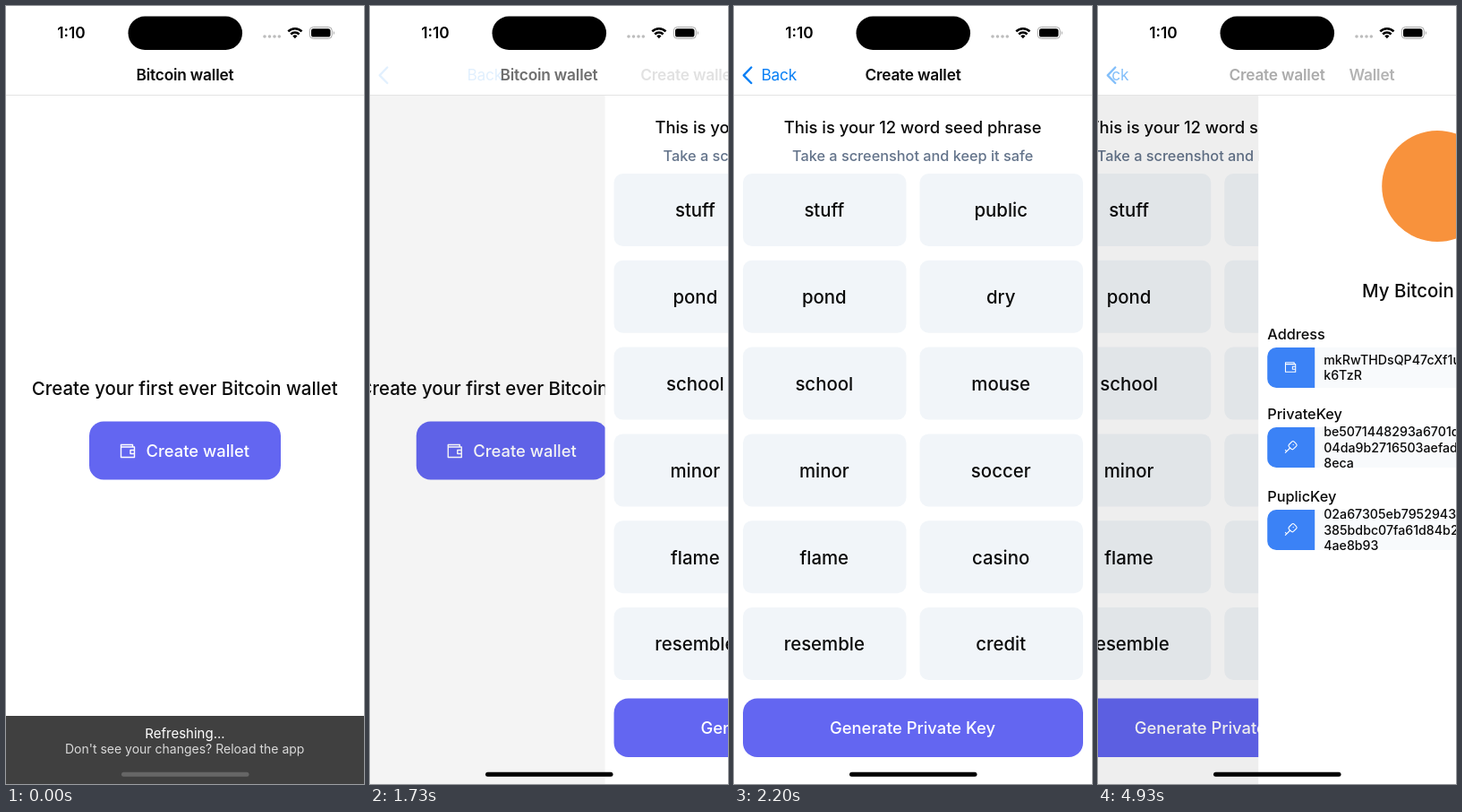
Animation of 400x868 px, one loop 5 s. Source, as an HTML page:

```html
<!DOCTYPE html>
<html lang="en">
<head>
<meta charset="utf-8">
<title>Wallet app</title>
<style>
  html, body { margin: 0; width: 100%; height: 100%; overflow: hidden; background: #fff; }
  svg { display: block; width: 400px; height: 868px; }
  text { font-family: Inter, "Liberation Sans", sans-serif; white-space: pre; }
  .nav { letter-spacing: -.2px; }
  .tile { fill: #f1f5f9; }
  .button { fill: #6366f1; }
  .pressed .button { fill: #e0e0fc; }
  .shade { opacity: 0; }
  .icon { fill: none; stroke: #fff; stroke-width: 1.4; stroke-linejoin: round; }
</style>
</head>
<body>
<svg id="stage" viewBox="0 0 400 868"></svg>
<script>
const INK = '#0a0a0a', BLUE = '#087ff5';
const FRAME = 1000 / 15, LOOP = 5000;
const PUSH1 = 25 * FRAME, PUSH2 = 4832;

// y is the middle of the capitals
const text = (x, y, size, str, { weight = 500, fill = INK, anchor = 'middle', extra = '' } = {}) =>
  `<text x="${x}" y="${(y + size * .364).toFixed(1)}" font-size="${size}" font-weight="${weight}" ` +
  `fill="${fill}" text-anchor="${anchor}" ${extra}>${str}</text>`;

const rect = (x, y, w, h, r, attrs) =>
  `<rect x="${x}" y="${y}" width="${w}" height="${h}" rx="${r}" ${attrs}/>`;

const page = (id, body) =>
  `<g id="${id}">${rect(0, 99, 400, 769, 0, 'fill="#fff"')}${body}` +
  `${rect(0, 99, 400, 769, 0, 'class="shade"')}</g>`;

const walletIcon = (x, y, scale = 1) =>
  `<path class="icon" transform="translate(${x} ${y}) scale(${scale})"
    d="M1 3.5V15h15V3.5ZM1 3.5V1h13v2.5M16 7h-4.500v4H16"/>`;

const keyIcon = (x, y) =>
  `<g class="icon" style="stroke-width:1.1" transform="translate(${x} ${y}) rotate(45)">
    <rect x="-3.500" y="-8" width="7" height="8" rx="1.800"/><path d="M0 0V8M0 5.500H-2.400M0-5.500V-4.300"/></g>`;

const title = (id, str) => `<g id="${id}">${text(200, 77, 17.3, str, { weight: 600, extra: 'class="nav"' })}</g>`;

const startPage = page('start',
  text(199.7, 427, 20.4, 'Create your first ever Bitcoin wallet') +
  rect(93, 463.5, 214, 65, 16, 'class="button"') +
  walletIcon(127.5, 488.5) +
  text(156.5, 496, 18.4, 'Create wallet', { fill: '#fff', anchor: 'start' }));

const words = 'stuff public pond dry school mouse minor soccer flame casino resemble credit'.split(' ');
const tile = (word, i) => {
  const col = i % 2, y = 187 + 96.8 * (i >> 1);
  return rect(10 + 197.5 * col, y, 182.5, 81, 10, 'class="tile"') + text(100.8 + 197.4 * col, y + 41, 20.4, word);
};
const seedPage = page('seed',
  text(199.7, 135.5, 18.4, 'This is your 12 word seed phrase') +
  text(199.7, 167, 16.3, 'Take a screenshot and keep it safe', { fill: '#64748b' }) +
  words.map(tile).join('') +
  rect(10, 772.5, 380, 65.5, 16, 'class="button"') +
  text(199.5, 805, 18.4, 'Generate Private Key', { fill: '#fff' }));

const field = (label, y, icon, lines) =>
  text(10, y - 15, 16.3, label, { anchor: 'start' }) +
  rect(10, y, 380, 45, 10, 'fill="#f8fafc"') +
  `<path d="M63 ${y}H20a10 10 0 0 0-10 10v25a10 10 0 0 0 10 10h43Z" fill="#3b82f6"/>` + icon +
  lines.map((s, i) => text(73, y + 22.3 + 17.3 * (i - (lines.length - 1) / 2), 14.2, s, { anchor: 'start' })).join('');

const walletPage = page('wallet',
  '<circle cx="200" cy="201" r="62" fill="#f8923c"/>' +
  text(200, 318, 20.4, 'My Bitcoin Wallet') +
  field('Address', 381, walletIcon(29.5, 397, .75), ['mkRwTHDsQP47cXf1uVaZ8eLt2NbGy', 'k6TzR']) +
  field('PrivateKey', 470, keyIcon(35.5, 493),
    ['be5071448293a6701d52f8c39e0b47', '04da9b2716503aefadc81b60e72f35', '8eca']) +
  field('PuplicKey', 562, keyIcon(35.5, 585),
    ['02a67305eb7952943d18f06c2b74e9', '385bdbc07fa61d84b2ae509c7136f', '4ae8b93']));

const statusBar =
  text(73, 30, 17.3, '1:10', { weight: 600, fill: '#000' }) +
  rect(136.5, 11.5, 127.5, 37.5, 18.7, 'fill="#000"') +
  [289, 294.5, 300, 305.3].map(x => `<circle cx="${x}" cy="34" r="1.8" fill="#bdbdbd"/>`).join('') +
  `<g fill="none" stroke="#000" stroke-width="2.500">
    <path d="M315.300 28.300a10.700 10.700 0 0 1 15.200 0M318.200 31.500a6.700 6.700 0 0 1 9.400 0"/></g>
   <path d="M322.900 36.300l-2.600-2.700a3.700 3.700 0 0 1 5.200 0Z"/>` +
  rect(339.3, 23.5, 25, 12.8, 4, 'fill="none" stroke="#a8a8a8"') +
  rect(341, 25.2, 21.5, 9.4, 2.6, 'fill="#000"') +
  '<path d="M365.800 28a2.300 2.300 0 0 1 0 4Z" fill="#a8a8a8"/>';

const stage = document.getElementById('stage');
stage.innerHTML = `
  <clipPath id="labelClip"><rect x="15" y="60" width="385" height="36"/></clipPath>
  ${startPage}${seedPage}${walletPage}
  ${rect(0, 0, 400, 99, 0, 'fill="#fff"')}
  ${rect(0, 99, 400, 1, 0, 'fill="#e4e4e4"')}
  ${title('title0', 'Bitcoin wallet')}${title('title1', 'Create wallet')}${title('title2', 'Wallet')}
  <path id="chevron" d="M19.300 68.500L10.800 77.300L19.300 86" fill="none" stroke="${BLUE}" stroke-width="2.400" stroke-linecap="round" stroke-linejoin="round"/>
  <g clip-path="url(#labelClip)"><g id="back">
    ${text(30.5, 77, 17.3, 'Back', { weight: 400, fill: BLUE, anchor: 'start', extra: 'class="nav"' })}
  </g></g>
  ${statusBar}
  <g id="banner">
    ${rect(0, 792, 400, 90, 0, 'fill="#404040"')}
    ${text(200, 811, 15, 'Refreshing...', { weight: 400, fill: '#fff' })}
    ${text(199.7, 829, 14, 'Don\'t see your changes? Reload the app', { weight: 400, fill: '#d9d9d9' })}
  </g>
  ${rect(129, 854.7, 142.5, 5, 2.5, 'id="home"')}`;

const $ = Object.fromEntries([...stage.querySelectorAll('[id]')].map(el => [el.id, el]));
const moveX = (el, x) => el.setAttribute('transform', `translate(${x.toFixed(2)} 0)`);
const show = (el, alpha) => { el.style.opacity = Math.max(0, Math.min(1, alpha)); };

// Critically damped spring: the share of the way still to go
const spring = ms => {
  if (ms <= 0) return 1;
  const a = 18.26 * ms / 1000;
  return a > 9.5 ? 0 : (1 + a) * Math.exp(-a);
};

// Bar items lag a little behind the page
const lag = left => left * (.86 + left * (1.195 - 1.06 * left));

function placePage(el, enter, leave, pressed) {
  moveX(el, 400 * enter - 120 * leave);
  el.style.display = enter === 1 || leave === 1 ? 'none' : '';
  el.classList.toggle('pressed', pressed);
  show(el.querySelector('.shade'), .12 * leave);
}

function placeTitle(el, enter, leave) {
  moveX(el, 200 * lag(enter));
  show(el, leave ? 1 - 1.2 * leave : (1 - enter) ** 2);
}

function render(ms) {
  const k = Math.floor((Math.floor(ms / 10) * 10 + 7) / FRAME);
  const t = k * FRAME;
  const in1 = spring(t - PUSH1), in2 = spring(t - PUSH2);
  const out1 = 1 - in1, out2 = 1 - in2;

  placePage($.start, 0, out1, k === 24);
  placePage($.seed, in1, out2, k >= 48 && t < PUSH2);
  placePage($.wallet, in2, 0, false);
  placeTitle($.title0, 0, out1);
  placeTitle($.title1, in1, out2);
  placeTitle($.title2, in2, 0);

  const fade = out1 ** 2 * (1 - .9 * out2);
  show($.chevron, fade);
  show($.back, fade);
  moveX($.back, 100 * lag(in1) - 73 * out2 ** 1.2);

  // Ease in and out over 350 ms; the banner is gone by half way
  const drop = Math.min(80, 76.5 * (2 * t / 350) ** 1.7);
  $.banner.setAttribute('transform', `translate(0 ${drop.toFixed(2)})`);
  $.home.setAttribute('fill', drop < 62 ? '#666' : '#000');
}

const began = performance.now();
function tick() {
  render((performance.now() - began) % LOOP);
  requestAnimationFrame(tick);
}
tick();
</script>
</body>
</html>
```
